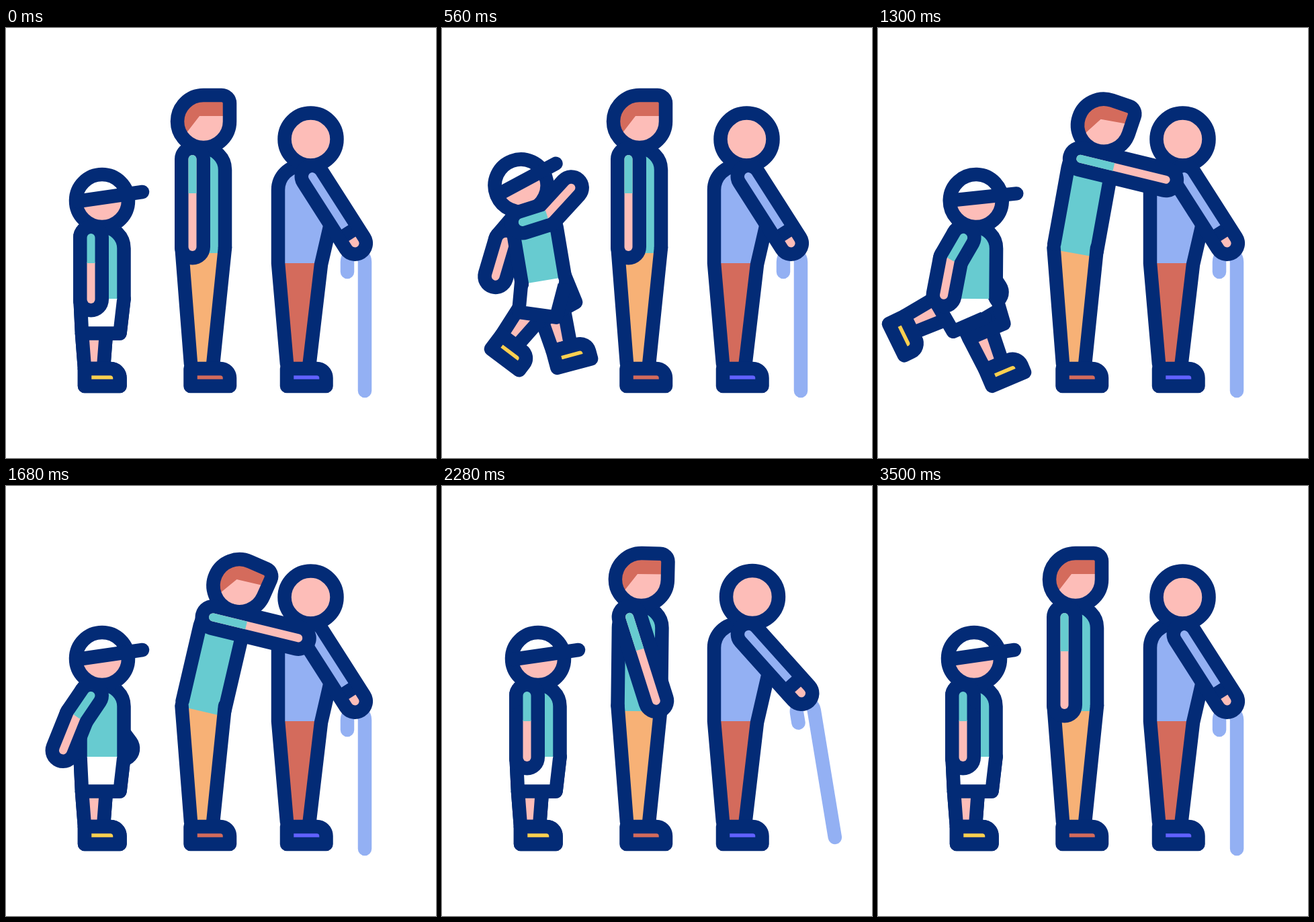
An HTML page for the animation above (3600 ms loop, 640 by 640 pixels).

```html
<!DOCTYPE html>
<html lang="en">
<head>
<meta charset="utf-8">
<title>Three generations</title>
<style>
  :root { --navy: #032b76; --pink: #fdbdb8; --teal: #67cbd0; --blue: #93b0f3; --red: #d46b5c; --orange: #f7b176; }
  html, body { margin: 0; width: 100%; height: 100%; overflow: hidden; background: #fff; }
  svg { display: block; width: 100vw; height: 100vh; }

  .line { stroke: var(--navy); stroke-width: 20.5; stroke-linecap: round; stroke-linejoin: round; }
  .open { fill: none; }
  .limb { stroke: var(--navy); stroke-width: 53; stroke-linecap: round; }
  .skin { stroke: var(--pink); stroke-width: 12; stroke-linecap: round; }
  .cane { fill: none; stroke: var(--blue); stroke-width: 20.5; stroke-linecap: round; }
  .white { fill: #fff; } .navy { fill: var(--navy); } .pink { fill: var(--pink); } .teal { fill: var(--teal); }
  .blue { fill: var(--blue); } .red { fill: var(--red); } .orange { fill: var(--orange); }
  .yellow { fill: #fdd050; } .violet { fill: #6161ff; }

  .move { animation: 3600ms cubic-bezier(.37, 0, .63, 1) infinite; }

  /* Child */
  .hop { animation-name: hop; }
  .kid-lean, .thigh { transform-origin: 143px 403px; }
  .kid-lean { animation-name: kid-lean; }
  .kid-head { transform-origin: 143px 310px; animation-name: kid-head; }
  .upper { transform-origin: 126.5px 312px; }
  .fore { transform-origin: 126.5px 350px; }
  .shin { transform-origin: 134px 452px; }
  .near.upper { animation-name: near-upper; }
  .near.fore { animation-name: near-fore; }
  .near.thigh { animation-name: near-thigh; }
  .near.shin { animation-name: near-shin; }
  .far.upper { animation-name: far-upper; }
  .far.fore { animation-name: far-fore; }
  .far.thigh { animation-name: far-thigh; }
  .far.shin { animation-name: far-shin; }

  @keyframes hop { 0%, 35%, to { translate: 0 0; } 15.56% { translate: 8px -27px; } 27.2% { translate: -2px -11px; } }
  @keyframes kid-lean { 0%, 41.1%, to { rotate: 0deg; } 15.56% { rotate: -9.5deg; } 27.2% { rotate: 1.5deg; } }
  @keyframes kid-head { 0%, 41.1%, to { rotate: 0deg; } 15.56% { rotate: -10.5deg; } 27.2% { rotate: 6.5deg; } }
  @keyframes near-upper {
    0%, 60.6%, to { rotate: 0deg; } 15.56% { rotate: -98deg; } 27.2% { rotate: -2deg; } 41.1% { rotate: 42deg; }
  }
  @keyframes near-fore { 0%, 60.6%, to { rotate: 0deg; } 15.56%, 27.2% { rotate: -30deg; } 41.1% { rotate: -15deg; } }
  @keyframes near-thigh {
    0%, 46.1%, to { rotate: 0deg; } 15.56% { rotate: 8deg; } 27.2% { rotate: 12deg; } 35.8% { rotate: 60deg; }
  }
  @keyframes near-shin {
    0%, 46.1%, to { rotate: 0deg; } 15.56% { rotate: 29deg; } 19.2% { rotate: 48deg; }
    27.2% { rotate: 9deg; } 35.8% { rotate: 4deg; }
  }
  @keyframes far-upper {
    0%, 60.6%, to { rotate: 0deg; } 15.56% { rotate: 50deg; } 27.2% { rotate: 5deg; } 41.1% { rotate: -27deg; }
  }
  @keyframes far-fore {
    0%, 60.6%, to { rotate: 0deg; } 15.56% { rotate: -24deg; } 27.2% { rotate: -10deg; } 41.1% { rotate: -18deg; }
  }
  @keyframes far-thigh {
    0%, 46.1%, to { rotate: 0deg; } 15.56% { rotate: -29deg; } 27.2% { rotate: -8deg; } 35.8% { rotate: -23deg; }
  }
  @keyframes far-shin { 0%, 27.2%, to { rotate: 0deg; } 15.56% { rotate: 14deg; } }

  /* Adult */
  .bow { transform-origin: 291px 328px; animation-name: bow; }
  .nod { transform-origin: 294px 199px; animation-name: nod; }
  .hair { transform-origin: 294px 139px; animation-name: hair; }
  .reach { transform-origin: 277.5px 195px; animation-name: reach; }
  @keyframes bow { 0%, 20.6%, 66.7%, to { rotate: 0deg; } 43.9% { rotate: 13.6deg; } }
  @keyframes nod { 0%, 20.6%, 66.7%, to { rotate: 0deg; } 43.9% { rotate: 11.2deg; } }
  @keyframes hair { 0%, 20.6%, 66.7%, to { rotate: 0deg; } 43.9% { rotate: -11.2deg; } }
  @keyframes reach { 0%, 16.7%, 71.4%, to { rotate: 0deg; } 39.4%, 44.4% { rotate: -91deg; } }

  /* Elder */
  .swing { transform-origin: 455px 220px; animation-name: swing; }
  .drift { animation-name: drift; }
  @keyframes swing { 0%, 48.6%, 97.8%, to { rotate: 0deg; } 73.3% { rotate: -14.3deg; } }
  @keyframes drift { 0%, 48.6%, 97.8%, to { translate: 0 0; } 73.3% { translate: 13px -.9px; } }
</style>
</head>
<body>
<svg viewBox="0 0 640 640">
  <defs>
    <path id="shoe" class="line" d="M418 507H462.5a14 14 0 0 1 14 14V533H418Z"/>
    <path id="thigh" class="line" d="M110.5 403L113 454.5H169.5L175.5 403"/>
    <g id="shin">
      <path class="line pink" d="M113 455L117 507H145L149 455"/>
      <path class="line yellow" d="M117 507H155a14 14 0 0 1 14.5 14V533H117Z"/>
    </g>
    <path id="upper" class="limb" d="M126.5 312V350"/>
    <g id="fore">
      <path class="limb" d="M126.5 350V404"/>
      <path class="skin" d="M126.5 350V404"/>
    </g>
    <path id="face" d="M294 100H321a12 12 0 0 1 12 12V139A39 39 0 1 1 294 100Z"/>
    <clipPath id="in-face"><use href="#face"/></clipPath>
  </defs>

  <g id="elder">
    <path class="red" d="M405 350L418 505H452L469 350Z"/>
    <path class="blue" d="M405 350V241A36 36 0 0 1 441 205L456 221L487 274L469 350Z"/>
    <path class="line open" d="M418 500L405 350V241A36 36 0 0 1 441 205L456 221L487 274L469 352L451 505"/>
    <use href="#shoe" class="violet"/>
    <circle class="line pink move drift" cx="453.5" cy="165.5" r="39"/>
    <g class="move swing">
      <path class="cane" d="M508 363V348a13 13 0 0 1 26 0V540"/>
      <g transform="translate(456 221) rotate(-32.6)">
        <path class="limb" d="M0 0V118"/>
        <path class="skin" d="M0 100V118"/>
        <path class="blue" d="M-6 0a6 6 0 0 1 12 0V90h-12Z"/>
        <path class="navy" d="M-7 90h14v20h-14Z"/>
      </g>
    </g>
  </g>

  <g id="adult">
    <path class="orange" d="M261.5 320L275 505H308L326 320Z"/>
    <path class="teal move bow" d="M262 335V211a32 32 0 0 1 64 0V335Z"/>
    <path class="line open" d="M275 500L261.5 327M326 327L307.7 505"/>
    <use href="#shoe" x="-143.5" class="red"/>
    <g class="move bow">
      <path class="line open" d="M261.5 327V211a32.25 32 0 0 1 64.5 0V327"/>
      <g class="move nod">
        <use href="#face" class="pink"/>
        <g clip-path="url(#in-face)">
          <path class="red move hair" d="M254 175L288 131H360V70H220V175Z"/>
        </g>
        <use href="#face" class="line open"/>
      </g>
      <g class="move reach">
        <path class="limb" d="M277.5 195V326"/>
        <path class="skin" d="M277.5 195V326"/>
        <path class="teal" d="M271.5 195a6 6 0 0 1 12 0V246h-12Z"/>
      </g>
    </g>
  </g>

  <g id="child" class="move hop">
    <g class="move kid-lean">
      <g class="move far upper">
        <use href="#upper"/>
        <g class="move far fore"><use href="#fore"/></g>
      </g>
    </g>
    <g class="move far thigh">
      <g class="move far shin"><use href="#shin"/></g>
      <use href="#thigh" class="navy"/>
    </g>
    <g class="move near thigh">
      <g class="move near shin"><use href="#shin"/></g>
      <use href="#thigh" class="white"/>
      <path class="white" d="M120 385H166V404H120Z"/>
    </g>
    <g class="move kid-lean">
      <path class="teal" d="M111 403V328a32 32 0 0 1 64 0V403Z"/>
      <path class="line open" d="M110.5 403V328a32.5 32 0 0 1 65 0V403"/>
      <g class="move kid-head">
        <circle class="white" cx="143" cy="257" r="39"/>
        <path class="pink" d="M104.7 258.1A39 39 0 1 0 181.3 246.9Z"/>
        <circle class="line open" cx="143" cy="257" r="39"/>
        <path class="line" d="M106 258L203 244"/>
      </g>
      <g class="move near upper">
        <use href="#upper"/>
        <g class="move near fore"><use href="#fore"/></g>
        <path class="teal" d="M120.5 312a6 6 0 0 1 12 0V350h-12Z"/>
      </g>
    </g>
  </g>
</svg>
</body>
</html>
```
